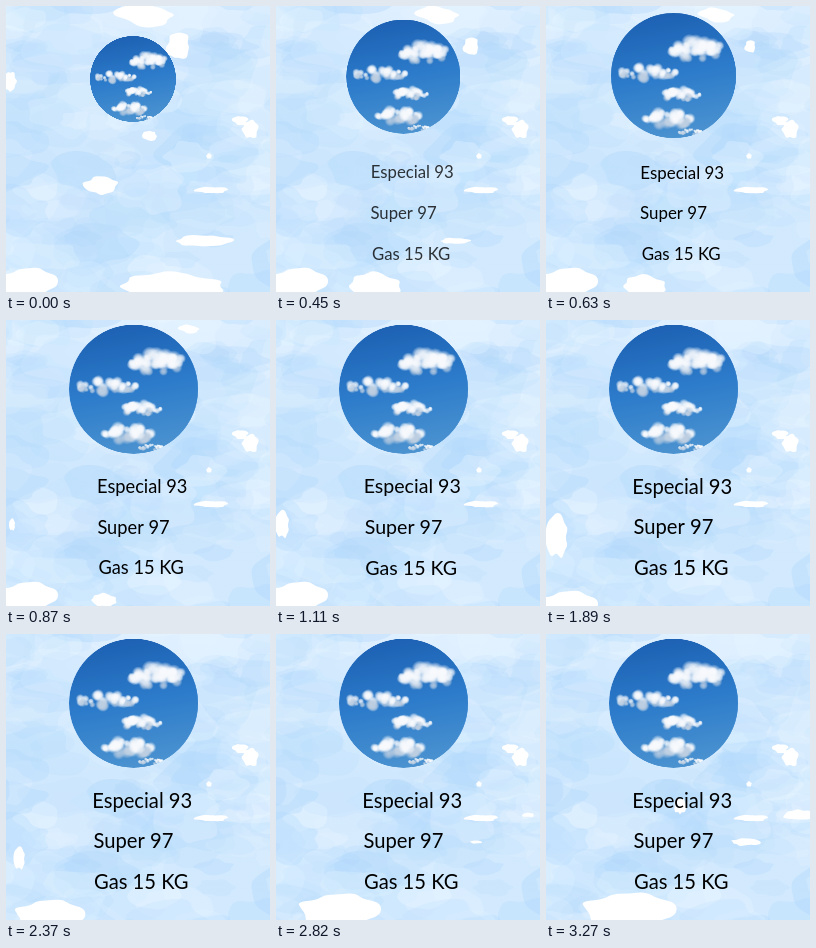
Write an HTML page with a canvas that moves like this. It is 264 by 286 pixels and loops after 3300 ms.

```html
<!DOCTYPE html>
<html lang="es">
<head>
<meta charset="utf-8">
<title>Especial 93</title>
<style>
html, body { margin: 0; width: 100%; height: 100%; overflow: hidden; background: #fff; }
canvas { display: block; width: 264px; height: 286px; }
</style>
</head>
<body>
<canvas id="stage" width="264" height="286"></canvas>
<script>
const W = 264, H = 286, LOOP = 3300, STEP = 30;
const ctx = document.getElementById('stage').getContext('2d');

const clamp = v => Math.max(0, Math.min(1, v));
const lerp = (a, b, k) => a + (b - a) * k;
const ramp = (t, from, to) => clamp((t - from) / (to - from));

function random(seed) {
  let s = seed * 7919 % 2147483647;
  const next = () => (s = s * 16807 % 2147483647) / 2147483647;
  next();
  next();
  return next;
}

function layer(w, h, paint) {
  const c = document.createElement('canvas');
  c.width = w;
  c.height = h;
  paint(c.getContext('2d'));
  return c;
}

// Ragged closed curve inside a w by h box
function blob(g, x, y, w, h, seed, n = 16) {
  const rnd = random(seed);
  const pts = Array.from({ length: n }, (_, i) => {
    const a = i / n * Math.PI * 2, r = 0.35 + rnd() * 0.25;
    return [x + Math.cos(a) * r * w, y + Math.sin(a) * r * h];
  });
  g.beginPath();
  for (let i = 0; i <= n; i++) {
    const p = pts[i % n], q = pts[(i + 1) % n];
    const mx = (p[0] + q[0]) / 2, my = (p[1] + q[1]) / 2;
    if (i) g.quadraticCurveTo(p[0], p[1], mx, my);
    else g.moveTo(mx, my);
  }
  g.fill();
}

function wash(g, seed, count, alpha) {
  const rnd = random(seed), tints = ['#a9d3f9', '#b9dcfb', '#eff8ff', '#e3f2ff'];
  for (let i = 0; i < count; i++) {
    g.globalAlpha = alpha * (0.5 + rnd());
    g.fillStyle = tints[Math.floor(rnd() * tints.length)];
    const w = 20 + rnd() * 80;
    blob(g, rnd() * 330 - 30, rnd() * 320 - 15, w, w * (0.35 + rnd() * 0.4), seed + i);
  }
  g.globalAlpha = 1;
}

const paper = layer(W, H, g => {
  const sky = g.createLinearGradient(0, 0, 0, H);
  sky.addColorStop(0, '#dceeff');
  sky.addColorStop(0.5, '#d0e8fd');
  sky.addColorStop(1, '#d3eafe');
  g.fillStyle = sky;
  g.fillRect(0, 0, W, H);
  wash(g, 41, 130, 0.24);
});
const drift = layer(W + 60, H, g => wash(g, 907, 60, 0.2));

// x, y, width, height
const steady = [[234, 114, 15, 10], [244, 123, 17, 19], [203, 150, 6, 5], [205, 184, 32, 7]];
const growing = [[252, 181, 30, 12], [134, 172, 12, 17], [200, 208, 30, 8]];
// x, y, width, height, end time, slide
const closing = [
  [140, 9, 58, 26, 1000, 50],
  [173, 41, 24, 28, 800, 40],
  [4, 75, 13, 22, 300, -4],
  [144, 130, 15, 12, 400, -4],
  [95, 180, 34, 18, 300, -7],
  [197, 235, 56, 13, 620, -25]
];

function drawGap(x, y, w, h, seed, size = 1) {
  if (size > 0.05) blob(ctx, x, y, w * size, h * size, seed);
}

function drawBackdrop(t) {
  ctx.drawImage(paper, 0, 0);
  ctx.drawImage(drift, -50 * (1 - t / LOOP), 0);
  ctx.fillStyle = '#fff';
  steady.forEach((box, i) => drawGap(...box, i + 3));
  growing.forEach((box, i) => drawGap(...box, i + 13, ramp(t, 2500, 3270)));
  closing.forEach(([x, y, w, h, end, slide], i) => {
    const k = ramp(t, 0, end);
    drawGap(x + slide * k, y, w, h, i + 23, Math.sqrt(1 - k));
  });

  const side = Math.sin(Math.PI * ramp(t, 700, 2700));
  drawGap(lerp(6, 15, ramp(t, 1110, 2700)), lerp(205, 230, ramp(t, 1110, 2700)), 25, 44, 33, side);

  const move = ramp(t, 1890, 3270), dip = Math.sin(Math.PI * ramp(t, 1110, 2670));
  drawGap(lerp(22, 82, move), 275 + 9 * dip, lerp(58, 94, move), lerp(29, 36, move), 34);

  const near = ramp(t, 0, 450);
  drawGap(lerp(162, 97, near), 280, lerp(116, 58, near), 30, 35, Math.sqrt(1 - ramp(t, 450, 1000)));
}

// Cloud: x, y, width, height on the disc
const clouds = [
  [24, -26, 68, 30], [-26, -3, 66, 21], [6, 20, 50, 18], [-6, 45, 60, 25], [17, 58, 28, 9]
];
const ZOOM = 2, R = 64.5;

function drawCloud(g, [x, y, w, h], seed) {
  const rnd = random(seed);
  for (let i = 0; i < 34; i++) {
    const u = rnd() * 2 - 1, room = 1 - u * u * 0.75, v = (rnd() * 2 - 1) * room;
    const r = h * (0.14 + rnd() * 0.2) * (0.5 + room / 2);
    const px = x + u * w * 0.43, py = y + v * h * 0.3;
    const tone = v > 0.3 ? 'rgb(190 207 226 / ' : 'rgb(248 250 253 / ';
    const puff = g.createRadialGradient(px, py, 0, px, py, r);
    puff.addColorStop(0, tone + '.9)');
    puff.addColorStop(0.55, tone + '.65)');
    puff.addColorStop(1, tone + '0)');
    g.fillStyle = puff;
    g.fillRect(px - r, py - r, r * 2, r * 2);
  }
}

const disc = layer(R * 2 * ZOOM, R * 2 * ZOOM, g => {
  g.scale(ZOOM, ZOOM);
  g.translate(R, R);
  g.beginPath();
  g.arc(0, 0, R, 0, Math.PI * 2);
  g.clip();
  const sky = g.createLinearGradient(-12, -R, 12, R);
  sky.addColorStop(0, '#1d61b3');
  sky.addColorStop(0.5, '#2d7ccb');
  sky.addColorStop(1, '#4c93d0');
  g.fillStyle = sky;
  g.fillRect(-R, -R, R * 2, R * 2);
  clouds.forEach((box, i) => drawCloud(g, box, i + 51));
});

function drawDisc(t) {
  const k = ramp(t, 0, 690), r = lerp(43, R, k);
  ctx.drawImage(disc, lerp(127, 127.6, k) - r, lerp(73, 69.2, k) - r, r * 2, r * 2);
}

const labels = [['Especial 93', 136.2, 166.5], ['Super 97', 127.5, 207], ['Gas 15 KG', 135.2, 247.7]];

function drawLabels(t) {
  const size = lerp(0.828, 1, ramp(t, 600, 1215));
  ctx.globalAlpha = ramp(t, 0, 570);
  ctx.fillStyle = '#000';
  ctx.font = '20.2px Lato, "Open Sans", sans-serif';
  ctx.textAlign = 'center';
  for (const [text, x, y] of labels) {
    ctx.save();
    ctx.translate(x, y);
    ctx.scale(size, size);
    ctx.fillText(text, 0, 7.2);
    ctx.restore();
  }
  ctx.globalAlpha = 1;
}

function draw(now) {
  const t = Math.floor(now % LOOP / STEP) * STEP;
  drawBackdrop(t);
  drawDisc(t);
  drawLabels(t);
}

const start = performance.now();
function tick() {
  draw(performance.now() - start);
  requestAnimationFrame(tick);
}
tick();
</script>
</body>
</html>
```
